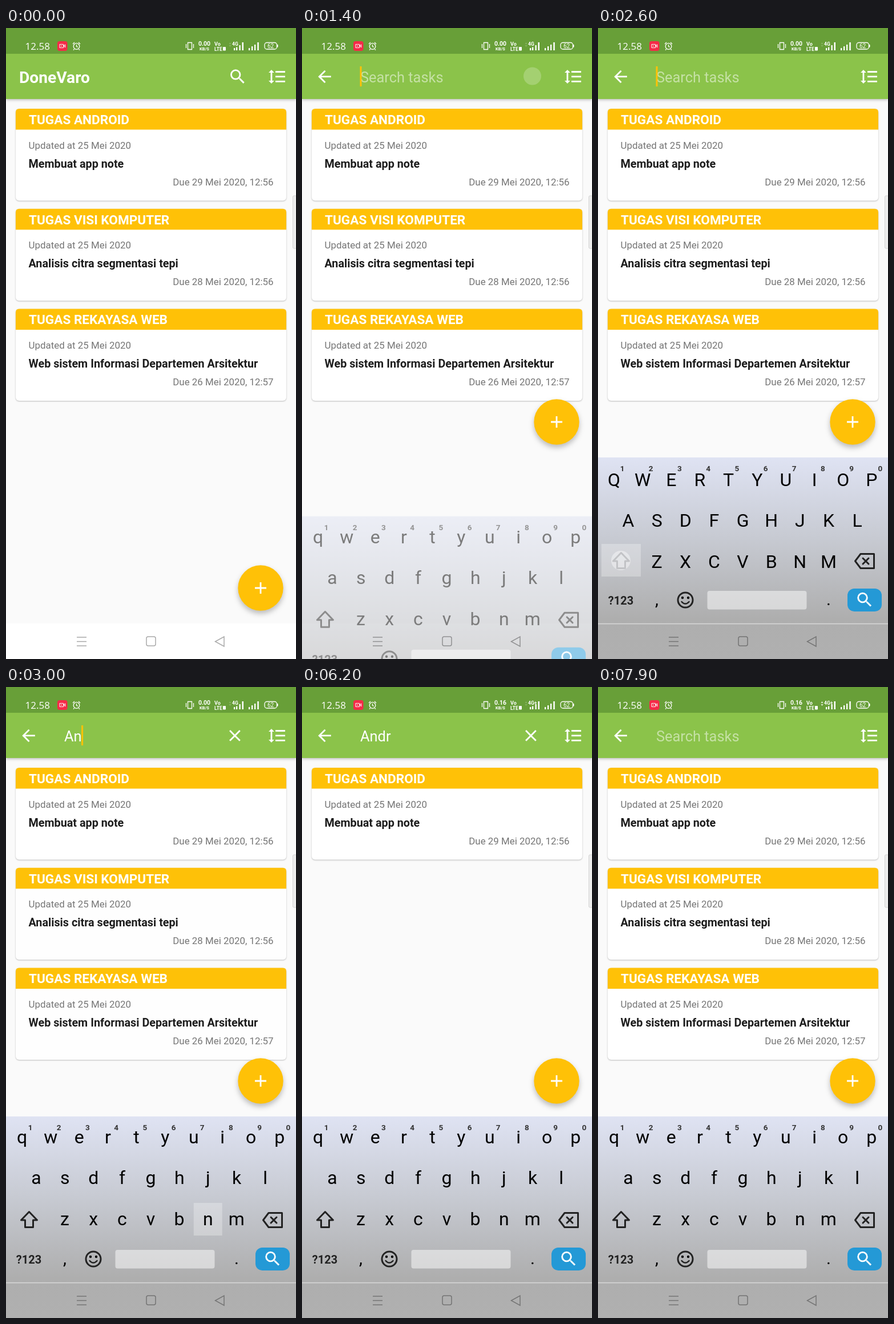
Animation of 508 by 1102 pixels, one loop 8000 ms. Source, as an HTML page:

```html
<!DOCTYPE html>
<html lang="id">
<head>
<meta charset="utf-8">
<title>Task search</title>
<style>
html, body { margin: 0; width: 100%; height: 100%; overflow: hidden; background: #fafafa; }
svg { display: block; width: 508px; height: 1102px; font-family: Roboto, sans-serif; }
.b { font-weight: 700; }
.m { text-anchor: middle; }
.line { fill: none; stroke-width: 3; stroke-linejoin: round; stroke-linecap: round; }
.card { filter: drop-shadow(0 1.5px 1.2px rgba(0,0,0,.26)); }
#fab { filter: drop-shadow(0 5px 5px rgba(0,0,0,.25)); }
#bar { filter: drop-shadow(0 2px 2px rgba(0,0,0,.22)); }
</style>
</head>
<body>
<svg id="stage" viewBox="0 0 508 1102">
  <defs>
    <linearGradient id="glass" x1="0" y1="0" x2="0" y2="1">
      <stop offset="0" stop-color="#dfe3f3"/>
      <stop offset=".4" stop-color="#c7cad2"/>
      <stop offset=".8" stop-color="#aeaeae"/>
      <stop offset="1" stop-color="#b0b0b0"/>
    </linearGradient>
    <path id="lens" d="M15.5 14h-.79l-.28-.27A6.47 6.47 0 0 0 16 9.5 6.5 6.5 0 1 0 9.5 16c1.61 0 3.09-.59 4.23-1.57l.27.28v.79l5 4.99L20.49 19l-4.99-5zm-6 0a4.5 4.5 0 1 1 0-9 4.5 4.5 0 0 1 0 9z"/>
  </defs>
  <rect width="508" height="1102" fill="#fafafa"/>
  <g id="cards"></g>
  <rect id="handle" x="502.5" y="293" width="8" height="92" rx="2" fill="#ededed" stroke="#d4d4d4"/>

  <g id="bar"><rect y="45" width="508" height="79" fill="#8bc34a"/></g>
  <rect width="508" height="45" fill="#689f38"/>
  <g id="status" fill="#fff">
    <text x="33.5" y="38" font-size="17" font-family="Open Sans, sans-serif">12.58</text>
    <rect x="90" y="23" width="17.5" height="17" rx="4" fill="#f52b48"/>
    <g fill="none" stroke="#fff" stroke-width="1.3">
      <path d="M94 28.5h6.5v6H94zM101 31l2.7-2v5zM96 31.5h2" stroke-width="1"/>
      <circle cx="123.5" cy="32" r="5.3"/>
      <path d="M123.5 29v3.3l2.3 1M117 28l3-3M130 28l-3-3M119.500 37l-1.500 1.500M127.500 37l1.500 1.500"/>
      <path d="M318.500 25.500h7v12h-7zM315.500 28v7M328.500 28v7"/>
      <rect x="453" y="25.500" width="21.500" height="11.500" rx="4"/>
    </g>
    <path d="M475 29h1.500v4.500H475z"/>
    <text id="speed" class="b m" x="347.500" y="31" font-size="10.500"></text>
    <text class="b m" x="347.500" y="39" font-size="7.500">KB/S</text>
    <text class="b" x="365" y="31" font-size="9">Vo</text>
    <text class="b" x="365" y="39.500" font-size="8.500">LTE</text>
    <rect x="380" y="33" width="5" height="6.500" rx="1"/>
    <text id="net" class="b" x="396" y="31" font-size="8.500"></text>
    <path id="arrows" d="M390.500 28l2-3 2 3zM390.500 30l2 3 2-3z"/>
    <path d="M399 35h2.300v4H399zM403 33.500h2.300V39H403zM408.500 30h2.300v9h-2.300zM413.500 25h2.500v14h-2.500z"/>
    <path d="M425 35h2.300v4H425zM430 32h2.300v7H430zM435 29h2.300v10H435zM440.300 25h2.500v14h-2.500z"/>
    <text class="m" x="463.500" y="35" font-size="10">62</text>
  </g>

  <g fill="#fff">
    <g id="home">
      <text class="b" x="23" y="95.500" font-size="28.200">DoneVaro</text>
      <use href="#lens" transform="translate(388.800 68) scale(1.411)"/>
    </g>
    <g id="search">
      <path transform="translate(22.600 68) scale(1.411)" d="M20 11H7.830l5.590-5.590L12 4l-8 8 8 8 1.410-1.410L7.830 13H20z"/>
      <text id="hint" x="102" y="95" font-size="25.400" opacity=".5">Search tasks</text>
      <text id="query" x="102" y="95" font-size="25.400"></text>
      <rect id="cursor" y="67" width="3" height="35" fill="#ffc107"/>
      <path id="clear" transform="translate(384 68) scale(1.411)" d="M19 6.410L17.590 5 12 10.590 6.410 5 5 6.410 10.590 12 5 17.590 6.410 19 12 13.410 17.590 19 19 17.590 13.410 12z"/>
    </g>
    <circle id="ripple" cx="403.500" cy="84" r="15.500"/>
    <path transform="translate(457.900 68) scale(1.411)" d="M6 7h2.500L5 3.500 1.500 7H4v10H1.500L5 20.500 8.500 17H6zM10 5v2h12V5zM10 19h12v-2H10zM10 13h12v-2H10z"/>
  </g>

  <g id="fab">
    <circle cx="446" r="39.700" fill="#ffc107"/>
    <path d="M436 0h20M446 -10v20" stroke="#fff" stroke-width="2.800"/>
  </g>

  <rect id="nav" y="1040" width="508" height="62" fill="#fff"/>
  <g id="keyboard">
    <rect y="750" width="508" height="353" fill="url(#glass)"/>
    <path d="M0 1040.500h508" stroke="#d8d8d8" stroke-width="1.500"/>
    <rect id="press" height="57" fill="#fff" opacity=".28"/>
    <g id="digits" class="b m" font-size="13.500" fill="#333"></g>
    <g id="lower" class="m" font-size="32"></g>
    <g id="upper" class="m" font-size="32"></g>
    <circle id="halo" cx="40" cy="930" r="17" fill="#fff" opacity=".4"/>
    <path id="shift" class="line" d="M40.500 916.500l14 14.500h-7v12.500h-14V931h-7z"/>
    <g class="line" stroke="#222">
      <path d="M460 918.500h23.500v25H460l-9.500-12.500zM464 926l10 10M474 926l-10 10"/>
      <circle cx="153" cy="999" r="13"/>
      <path d="M146.500 1002q6.500 7 13 0" stroke-width="2.500"/>
    </g>
    <circle cx="148" cy="995" r="2.200"/><circle cx="158" cy="995" r="2.200"/>
    <text class="b m" x="40" y="1007" font-size="20" fill="#222">?123</text>
    <text class="m" x="103" y="1008" font-size="30">,</text>
    <text class="m" x="404" y="1008" font-size="30">.</text>
    <rect x="191.500" y="983" width="174" height="32.500" rx="4" fill="#fff" opacity=".5"/>
    <rect x="437" y="979" width="60" height="40" rx="12" fill="#2499d6"/>
    <use href="#lens" fill="#fff" transform="translate(450 981.500) scale(1.420)"/>
  </g>
  <g fill="none" stroke="#000" stroke-opacity=".34" stroke-width="1.500">
    <path d="M124 1064h17M124 1071.500h17M124 1079h17M382 1063v17l-15.500-8.500z"/>
    <rect x="246" y="1063" width="16" height="16" rx="3"/>
  </g>
</svg>
<script>
const $ = id => document.getElementById(id);
const set = (id, attrs) => { for (const k in attrs) $(id).setAttribute(k, attrs[k]); };
const show = (id, on) => set(id, { visibility: on ? 'visible' : 'hidden' });
const clamp = v => Math.max(0, Math.min(1, v));

const LOOP = 8000, TAP = 1200, FOCUS = 1300, SHIFT = 2600, FILTER = 3000, RESTORE = 7100;
const PITCH = 50.15;
const rows = [['qwertyuiop', 28, 797], ['asdfghjkl', 53, 868], ['zxcvbnm', 103, 940]];

// time, query after the key, key pressed
const edits = [
  [2800, 'A', 'a'], [3000, 'An', 'n'], [3250, 'And', 'd'], [3500, 'Andr', 'r'],
  [6600, 'And', '<'], [6850, 'An', '<'], [RESTORE, 'A', '<'], [7400, '', '<']
];

const tasks = [
  ['TUGAS ANDROID', 'Membuat app note', '29 Mei 2020, 12:56'],
  ['TUGAS VISI KOMPUTER', 'Analisis citra segmentasi tepi', '28 Mei 2020, 12:56'],
  ['TUGAS REKAYASA WEB', 'Web sistem Informasi Departemen Arsitektur', '26 Mei 2020, 12:57']
];

$('cards').innerHTML = tasks.map(([head, note, due], i) => `
  <g id="card${i}" transform="translate(0 ${141 + i * 174.7})">
    <rect class="card" x="17" width="474" height="160.500" rx="6" fill="#fff"/>
    <path d="M17 36.500V6q0-6 6-6h462q6 0 6 6v30.500z" fill="#ffc107"/>
    <text class="b" x="40" y="27" font-size="22.580" fill="#fff">${head}</text>
    <text x="39.500" y="69.500" font-size="16.900" fill="#757575">Updated at 25 Mei 2020</text>
    <text class="b" x="39.500" y="102.500" font-size="19.750" fill="#1c1c1c">${note}</text>
    <text x="468.500" y="133.500" font-size="16.900" fill="#757575" text-anchor="end">Due ${due}</text>
  </g>`).join('');

const label = (s, x, y) => `<text x="${x}" y="${y}">${s}</text>`;
const letters = (dy, style) => rows.map(([keys, x, y]) =>
  [...keys].map((c, i) => label(style(c), x + i * PITCH, y + dy)).join('')).join('');
$('lower').innerHTML = letters(0, c => c);
$('upper').innerHTML = letters(2.5, c => c.toUpperCase());
$('digits').innerHTML = [...'1234567890'].map((c, i) => label(c, 42.5 + i * 50.2, 774)).join('');

function keyBox(key) {
  if (key === 'shift') return { x: 6, y: 901, width: 69 };
  if (key === '<') return { x: 433, y: 901, width: 69 };
  const [keys, x, y] = rows.find(r => r[0].includes(key));
  return { x: x + keys.indexOf(key) * PITCH - 25, y: y - 39, width: 50 };
}

function render(t) {
  const open = t >= FOCUS;
  show('home', !open);
  show('search', open);
  const fade = t < TAP ? 0 : 1 - clamp((t - 1400) / 200);
  set('ripple', { opacity: .22 * fade });

  const edit = edits.filter(e => e[0] <= t).pop() || [FOCUS, '', ''];
  const [since, query, key] = edit;
  $('query').textContent = query;
  show('hint', open && !query);
  show('clear', open && query);
  const blink = Math.floor((t - since) / 500) % 2 === 0 && !(t >= 6500 && t < 6600);
  show('cursor', open && blink);
  set('cursor', { x: 101.5 + (query ? $('query').getComputedTextLength() : 0) });

  const others = 1 - clamp((t - FILTER) / 120) + clamp((t - RESTORE) / 120);
  set('card1', { opacity: others });
  set('card2', { opacity: others });
  set('fab', { transform: `translate(0 ${t < 1350 ? 978 : 688})` });

  const p = clamp((t - FOCUS) / 300);
  set('keyboard', { transform: `translate(0 ${352 * (1 - p) ** 3})`, opacity: clamp(p * 1.5) });

  const caps = t >= SHIFT && t < edits[0][0];
  show('upper', caps);
  show('lower', !caps);
  show('halo', caps);
  set('shift', { fill: caps ? '#929292' : 'none', stroke: caps ? '#c2c3c6' : '#222' });
  const pressed = caps ? 'shift' : t - since < 130 && key;
  show('press', pressed);
  if (pressed) set('press', keyBox(pressed));

  $('speed').textContent = t < 5500 ? '0.00' : '0.16';
  $('net').textContent = t < 5900 ? '4G' : '4G+';
  set('arrows', { opacity: t < 7500 ? .2 : .8 });
}

function tick() {
  render(performance.now() % LOOP);
  requestAnimationFrame(tick);
}
tick();
</script>
</body>
</html>
```
